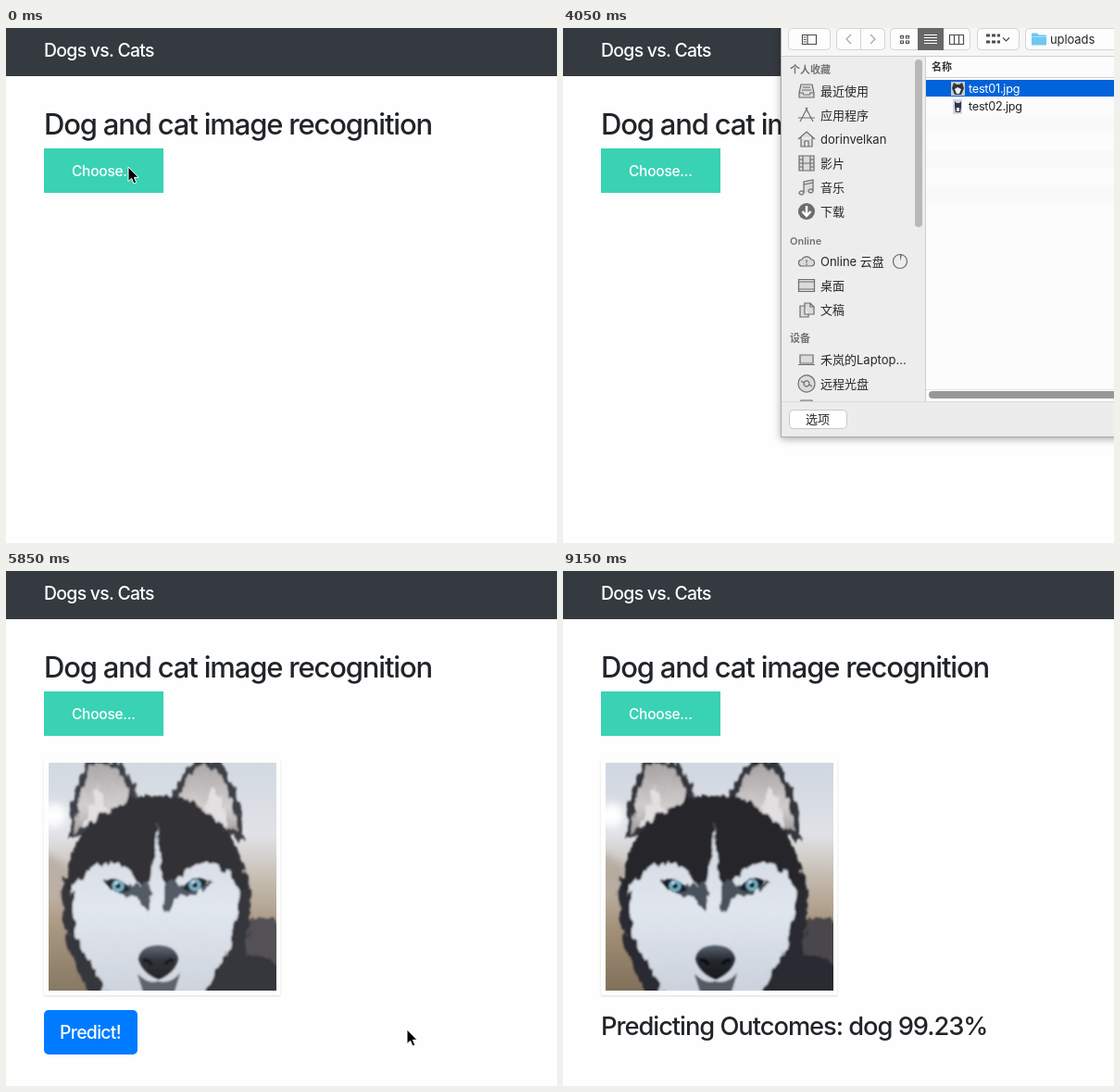
An HTML page for the animation above (9900 ms loop, 595 by 556 pixels).

```html
<!DOCTYPE html>
<html lang="zh-CN">
<head>
<meta charset="utf-8">
<title>Dog and cat image recognition</title>
<style>
html, body { margin: 0; width: 100%; height: 100%; overflow: hidden; background: #fefefe; }
svg { display: block; }
text { font-family: Inter, "Noto Sans CJK SC", "Noto Sans CJK", sans-serif; font-optical-sizing: none; white-space: pre; }
.title { font-weight: 500; letter-spacing: -.038em; fill: #212529; }
.large { font-size: 19.4px; font-weight: 500; letter-spacing: -.036em; fill: #fff; }
.item { font-size: 13px; fill: #262626; }
.file { font-size: 12.7px; letter-spacing: -.02em; fill: #222; }
.group { font-size: 11px; font-weight: 600; fill: #737373; }
.icon { fill: none; stroke: #6c6c6c; stroke-width: 1.2; }
.control { fill: #fdfdfd; stroke: #d3d3d3; }
</style>
</head>
<body>
<svg width="595" height="556" viewBox="0 0 595 556">
  <defs>
    <linearGradient id="backdrop" x2="0" y2="1">
      <stop offset="0" stop-color="#d0d7e1"/><stop offset=".32" stop-color="#dfe1e5"/>
      <stop offset=".5" stop-color="#c4bbb0"/><stop offset=".72" stop-color="#a4927a"/><stop offset="1" stop-color="#80705a"/>
    </linearGradient>
    <linearGradient id="face" x2="0" y2="1">
      <stop offset="0" stop-color="#cfd5de"/><stop offset=".5" stop-color="#e1e6ee"/><stop offset="1" stop-color="#c9d0da"/>
    </linearGradient>
    <linearGradient id="ear" x2="0" y2="1">
      <stop offset="0" stop-color="#a8a3a4"/><stop offset=".6" stop-color="#d2cdcd"/><stop offset="1" stop-color="#a19b9c"/>
    </linearGradient>
    <linearGradient id="nose" x2="0" y2="1">
      <stop offset="0" stop-color="#596271"/><stop offset=".45" stop-color="#25282f"/><stop offset="1" stop-color="#15161b"/>
    </linearGradient>
    <filter id="fur" x="-10%" y="-10%" width="120%" height="120%">
      <feTurbulence type="fractalNoise" baseFrequency=".16 .07" numOctaves="2" seed="4"/>
      <feDisplacementMap in="SourceGraphic" scale="12" xChannelSelector="R" yChannelSelector="G"/>
      <feGaussianBlur stdDeviation="1.3"/>
    </filter>
    <filter id="soft" x="-10%" y="-10%" width="120%" height="120%"><feGaussianBlur stdDeviation="1"/></filter>
    <filter id="blur" x="-50%" y="-50%" width="200%" height="200%"><feGaussianBlur stdDeviation="5"/></filter>
    <filter id="card" x="-5%" y="-5%" width="110%" height="110%"><feDropShadow dx="0" dy="1" stdDeviation=".8" flood-opacity=".14"/></filter>
    <filter id="sheet" x="-10%" y="-10%" width="120%" height="120%"><feDropShadow dx="0" dy="2" stdDeviation="4" flood-opacity=".32"/></filter>
    <clipPath id="photoClip"><path d="M46 207H292V453H46Z"/></clipPath>
  </defs>

  <path d="M0 0H595V556H0Z" fill="#fefefe"/>
  <path d="M0 0H595V52H0Z" fill="#343a40"/>
  <text class="large" x="41" y="31">Dogs vs. Cats</text>
  <text class="title" x="41" y="115" font-size="31">Dog and cat image recognition</text>
  <path id="choose" d="M41 130H170V178H41Z"/>
  <text id="chooseText" x="71" y="160" font-size="15.5" font-weight="500" letter-spacing="-.25">Choose...</text>

  <g id="preview">
    <path d="M41 203H296V458H41Z" fill="#fefefe" filter="url(#card)"/>
    <g clip-path="url(#photoClip)">
      <path d="M46 207H292V453H46Z" fill="url(#backdrop)"/>
      <g filter="url(#blur)">
        <ellipse cx="52" cy="264" rx="14" ry="13" fill="#fff"/>
        <path d="M36 300L70 320V350L36 345Z" fill="#b7aca0"/>
      </g>
      <g filter="url(#fur)">
        <path d="M250 383Q277 367 300 380V460H205Z" fill="#48464b"/>
        <path d="M238 420Q268 405 300 430V460H225Z" fill="#2c2c32"/>
        <path d="M60 330C58 380 68 420 92 460H238C262 425 266 375 262 330Z" fill="#2a2b31"/>
        <path d="M67 290C70 255 77 220 90 205H119C132 215 138 230 143 248L110 275Z" fill="#33343a"/>
        <path d="M73 284C76 252 83 226 93 211Q113 205 124 217L134 244L103 263Z" fill="url(#ear)"/>
        <path d="M84 276Q91 247 101 232Q103 252 112 258Z" fill="#e2dfe1"/>
        <path d="M178 246C186 227 194 212 207 205H231C247 228 255 262 257 292L222 273Z" fill="#33343a"/>
        <path d="M187 243C193 226 201 213 211 210Q228 211 235 227C244 246 249 262 251 284L218 263Z" fill="url(#ear)"/>
        <path d="M216 260L223 232Q237 252 240 277Z" fill="#e2dfe1"/>
        <path d="M64 342C68 308 73 284 106 264Q137 238 163 244Q190 237 219 264C249 282 256 308 260 342L163 370Z" fill="#25262c"/>
        <path d="M73 342Q84 321 106 315Q127 314 139 331Q150 346 157 331Q161 300 163 270Q165 300 169 331Q176 346 187 331Q199 314 219 315Q240 321 251 341C254 375 245 405 228 428Q220 446 213 460H112Q102 446 95 430C76 405 68 370 73 342Z" fill="url(#face)"/>
        <path d="M104 335Q120 329 137 341L153 333Q160 350 152 369Q147 353 136 350Q120 353 104 335Z" fill="#4a515b"/>
        <path d="M222 335Q206 329 190 341L174 333Q167 350 175 369Q180 353 190 350Q206 353 222 335Z" fill="#4a515b"/>
      </g>
      <g filter="url(#soft)">
        <path d="M142 435Q154 447 164 443Q178 447 188 434L180 460H150Z" fill="#555a63"/>
        <path d="M143 419Q145 405 164 404Q184 405 186 419Q183 433 165 441Q147 434 143 419Z" fill="url(#nose)"/>
        <path d="M148 421Q153 418 157 425M172 425Q176 418 181 421" fill="none" stroke="#0b0c10" stroke-width="4"/>
        <g id="eyes"></g>
      </g>
    </g>
  </g>

  <g id="predict">
    <rect id="predictFill" x="41" y="474" width="101" height="48" rx="5"/>
    <text class="large" x="58" y="505">Predict!</text>
  </g>
  <g id="loader" fill="none" stroke-width="8">
    <circle r="21" stroke="#f3f3f3"/>
    <path d="M-14.85-14.85A21 21 0 0 1 14.85-14.85" stroke="#3498db"/>
  </g>
  <text id="result" class="title" x="41" y="501" font-size="27.3">Predicting Outcomes: dog 99.23%</text>

  <g id="dialog">
    <path d="M235.500-20H640V441.500H235.500Z" fill="#ececec" stroke="#aaa" filter="url(#sheet)"/>
    <path d="M236-20H600V30H236Z" fill="#f6f6f6"/>
    <path d="M236 31H391V403H236Z" fill="#eeeded"/>
    <path d="M392 31H600V403H392Z" fill="#fcfcfc"/>
    <path d="M392 94H600V113H392ZM392 132H600V151H392ZM392 170H600V189H392Z" fill="#f9f9f9"/>
    <path d="M236 30.500H600M391.500 31V403M392 53.500H600" stroke="#cfcfcf"/>
    <rect x="380" y="34" width="8" height="181" rx="4" fill="#b8b8b8"/>

    <g class="control">
      <rect x="243.500" y=".5" width="45" height="23" rx="4"/>
      <rect x="295.500" y=".5" width="52" height="23" rx="4"/>
      <rect x="353.500" y=".5" width="86" height="23" rx="4"/>
      <rect x="447.500" y=".5" width="45" height="23" rx="4"/>
      <rect x="499.500" y=".5" width="140" height="23" rx="4"/>
      <path d="M321.500 1V23"/>
    </g>
    <path d="M383 0H411V24H383Z" fill="#686868"/>
    <g fill="none" stroke="#4d4d4d" stroke-width="1.2">
      <path d="M258.500 7.500H273.500V17.500H258.500ZM264 7.500V17.500M260 10H262.500M260 12.500H262.500M260 15H262.500"/>
      <path d="M311 7L306 12L311 17M332 7L337 12L332 17" stroke="#a5a5a5"/>
      <path d="M364.500 8.500H367.500V11H364.500ZM370.500 8.500H373.500V11H370.500ZM364.500 14H367.500V16.500H364.500ZM370.500 14H373.500V16.500H370.500Z"/>
      <path d="M390 7.500H404M390 10.500H404M390 13.500H404M390 16.500H404" stroke="#fff"/>
      <path d="M417.500 7.500H432.500V17.500H417.500ZM422.500 7.500V17.500M427.500 7.500V17.500"/>
      <path d="M457 8H461M463 8H467M469 8H472M457 15H461M463 15H467M469 15H472" stroke-width="3"/>
      <path d="M475 10.500L478.500 14L482 10.500"/>
    </g>
    <path d="M506 6.500Q506 5.500 507 5.500H512L514 7.500H521Q522 7.500 522 8.500V18.500H506Z" fill="#6fc8f2"/>
    <path d="M506 9.500H522" stroke="#a5dff9"/>
    <text class="item" x="526" y="17" letter-spacing="-.1">uploads</text>

    <text class="group" x="398" y="46" style="fill:#333">名称</text>
    <path id="selection" d="M392 56H600V74H392Z" fill="#0063d9"/>
    <path d="M419 58H434V73H419Z" fill="#c8cbd0"/>
    <path d="M420 65L422 59L425 61H428L431 59L433 65L430 72H423Z" fill="#34363d"/>
    <path d="M423 66L426 64L430 66L428 71H425Z" fill="#eef0f3"/>
    <path d="M421 77H431V93H421Z" fill="#d4d7e2"/>
    <path d="M423 79L425 81H428L430 79V85L429 91H424L423 85Z" fill="#30354c"/>
    <path d="M425 86H428V90H425Z" fill="#f1f1f4"/>
    <text id="fileName" class="file" x="438" y="70">test01.jpg</text>
    <text class="file" x="438" y="89">test02.jpg</text>

    <g id="sidebar"></g>
    <path d="M392 390.500H600" stroke="#e7e7e7"/>
    <rect id="thumb" x="395" y="392" width="220" height="8" rx="4"/>
    <path d="M236 403H600V441H236Z" fill="#ececec"/>
    <path d="M236 403.500H600" stroke="#dcdcdc"/>
    <rect x="244.500" y="412.500" width="62" height="20" rx="4" fill="#fff" stroke="#c8c8c8"/>
    <text class="item" x="262" y="427">选项</text>
  </g>

  <g id="cursor" stroke-linejoin="round">
    <path id="arrow" d="M0 0V15.500L3.600 12.300L6 18L8.800 16.800L6.400 11.300H11Z" fill="#000" stroke="#fff"/>
    <path id="hand" d="M1 9V1.800A1.600 1.600 0 0 1 4.200 1.800V7L10.500 8.300Q12 8.800 11.600 12L10 19H3L-2.800 12Q-3 9.800-.8 10.300L1 12Z" fill="#fff" stroke="#000"/>
  </g>
</svg>
<script>
const LOOP = 9900, STEP = 150;
const $ = id => document.getElementById(id);
const clamp = v => Math.max(0, Math.min(1, v));
const swing = v => .5 - Math.cos(Math.PI * clamp(v)) / 2;
const mix = (a, b, p) => `rgb(${a.map((v, i) => Math.round(v + (b[i] - v) * p))})`;
const show = (id, on) => $(id).style.display = on ? '' : 'none';
const set = (id, name, value) => $(id).setAttribute(name, value);

const TEAL = [57, 210, 180], SLATE = [52, 73, 94], WHITE = [255, 255, 255];

// Sidebar entries: centre line, label, icon drawn around its own centre.
const places = [
  [68, '最近使用', 'M-6-7H6L8 2V7H-8V2ZM-8 2H-4L-3 4H3L4 2H8M-4-4H4M-5-1H5'],
  [94, '应用程序', 'M-7 7L1-8M-1-8L7 7M-9 3H9'],
  [120, 'dorinvelkan', 'M-9 0L0-8L9 0M-6-2V8H6V-2M-2 8V2H2V8'],
  [146, '影片', 'M-8-8H8V8H-8ZM-4-8V8M4-8V8M-4 0H4M-8-4H-4M-8 0H-4M-8 4H-4M4-4H8M4 0H8M4 4H8'],
  [172, '音乐', 'M-3 6V-6L7-8V4M-3-3L7-5M-3 6A2.500 2 0 1 1-3 5.900M7 4A2.500 2 0 1 1 7 3.900'],
  [198, '下载', ''],
  [252, 'Online 云盘', 'M-5 5A3.500 3.500 0 0 1-5-2A5.500 5.500 0 0 1 5-2A3.500 3.500 0 0 1 5 5ZM0-2V1.500M0 2.500V4'],
  [278, '桌面', 'M-8.500-6.500H8.500V6.500H-8.500ZM-8-4H8M-8 4H8'],
  [304, '文稿', 'M-2-7H4L8-3V5H-2ZM4-7V-3H8M-2-4H-7V8H2V5'],
  [358, '禾岚的Laptop...', 'M-7-5H7V4H-7ZM-9 5.500H9'],
  [384, '远程光盘', 'M9 0A9 9 0 1 1 9-.1M3 0A3 3 0 1 1 3-.1M-6-3L-3-1M6 3L3 1'],
  [410, '', 'M-6-8H6V6H-6Z']
];
const groups = [[45, '个人收藏'], [230, 'Online'], [335, '设备']];
$('sidebar').innerHTML =
  groups.map(([y, label]) => `<text class="group" x="245" y="${y + 4}">${label}</text>`).join('') +
  places.map(([y, label, icon]) =>
    `<path class="icon" style="fill:#6c6c6c22" transform="translate(263 ${y})" d="${icon}"/>
     <text class="item" x="278" y="${y + 4.7}">${label}</text>`).join('') +
  `<circle cx="263" cy="198" r="9" fill="#6c6c6c"/>
   <path d="M263 192V202M258.500 198L263 203L267.500 198" fill="none" stroke="#fff" stroke-width="2.500"/>
   <circle class="icon" cx="364" cy="252" r="7.500"/>
   <path d="M364 252V244.500A7.500 7.500 0 0 1 366 244.800Z" fill="#6c6c6c"/>`;

$('eyes').innerHTML = [[121, 340], [204, 339]].map(([x, y]) =>
  `<g transform="translate(${x} ${y})">
     <path d="M-14-4Q0-14 13 4Q0 13-14-4Z" fill="#191e25" ${x > 163 ? 'transform="scale(-1 1)"' : ''}/>
     <circle r="6.500" fill="#78b4ca"/><circle r="3" fill="#111922"/><circle cx="-2" cy="-3" r="1.500" fill="#e9f8ff"/>
   </g>`).join('');

const route = [
  [0, 132, 150], [1350, 132, 150], [1800, 458, 170], [1950, 540, 141], [2100, 534, 112],
  [2250, 520, 92], [2400, 495, 80], [2700, 467, 70], [3300, 467, 70],
  [5400, 640, 478], [5550, 583, 486], [5850, 433, 495], [6150, 280, 499], [6300, 225, 500],
  [6600, 130, 500], [6750, 112, 500], [7350, 112, 500], [7950, 232, 540], [8100, 250, 560], [LOOP, 250, 560]
];
function along(t) {
  const i = route.findIndex(k => k[0] > t);
  const [t0, x0, y0] = route[i - 1], [t1, x1, y1] = route[i];
  const p = (t - t0) / (t1 - t0);
  return [x0 + (x1 - x0) * p, y0 + (y1 - y0) * p];
}
const within = (t, a, b) => t >= a && t < b;

function draw(t) {
  const hover = Math.min(clamp((t - 1050) / 300), clamp((1860 - t) / 300));
  set('choose', 'fill', mix(TEAL, SLATE, hover));
  set('chooseText', 'fill', mix(WHITE, TEAL, hover));

  const open = Math.min(clamp((t - 1050) / 450), clamp((5100 - t) / 450));
  show('dialog', open > 0);
  set('dialog', 'transform', `translate(0 ${-455 * (1 - swing(open))})`);
  show('selection', t >= 3000);
  $('fileName').style.fill = t >= 3000 ? '#fff' : '';
  set('thumb', 'fill', within(t, 4050, 4200) ? '#989898' : within(t, 4200, 4350) ? '#a8a8a8' : '#c1c1c1');

  set('preview', 'opacity', swing((t - 5300) / 650));
  show('predict', within(t, 5400, 7050));
  set('predictFill', 'fill', t >= 6600 ? '#0069d9' : '#007bff');
  show('loader', within(t, 7050, 8550));
  set('loader', 'transform', `translate(66 499) rotate(${(t - 6975) * .36})`);
  set('result', 'opacity', swing((t - 8500) / 600));

  const hand = within(t, 450, 1350) || within(t, 6600, 7350);
  show('cursor', t < 3300 || t >= 5400);
  show('hand', hand);
  show('arrow', !hand);
  set('cursor', 'transform', `translate(${along(t)})`);
}

const start = performance.now();
function tick() {
  const t = (performance.now() - start) % LOOP;
  draw(Math.floor(t / STEP) * STEP);
  requestAnimationFrame(tick);
}
tick();
</script>
</body>
</html>
```
